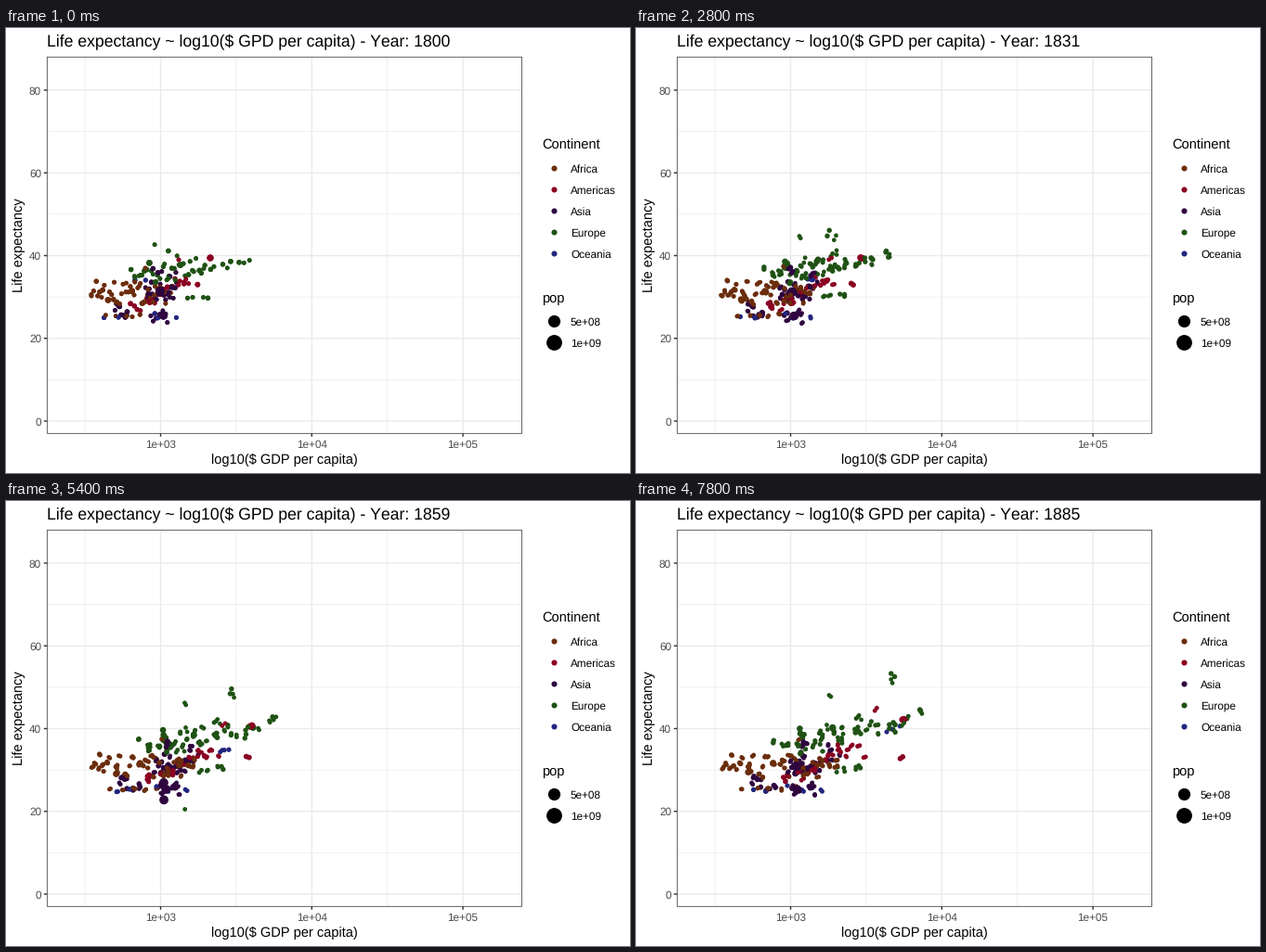
These frames come from a looping animation (672 px wide and 480 px high, 8000 ms). A matplotlib script:

```python
import numpy as np
import matplotlib.pyplot as plt
from matplotlib.animation import FuncAnimation
from matplotlib.patches import Rectangle

W, H, DPI = 672, 480, 96
FRAMES, INTERVAL = 40, 200
LAST = FRAMES - 1
PT = 72 / DPI  # points per pixel

COLORS = {
    "Africa": "#6b2d0c",
    "Americas": "#8b0022",
    "Asia": "#2f053f",
    "Europe": "#1f5214",
    "Oceania": "#23267f",
}
LATE = {"Americas": 3, "Oceania": 7}  # how late life expectancy rises
SWING = {"Europe": 3}  # size of the yearly swing

rng = np.random.default_rng(18)

plt.rcParams["font.family"] = "Liberation Sans"
plt.rcParams["text.hinting"] = "none"
plt.rcParams["text.kerning_factor"] = 6

fig = plt.figure(figsize=(W / DPI, H / DPI), dpi=DPI, facecolor="white")
ax = fig.add_axes([0, 0, 1, 1])
ax.set_xlim(0, W)
ax.set_ylim(H, 0)
ax.axis("off")


def gdp_x(decade):
    return 166.5 + 162.8 * (decade - 3)


def life_y(years):
    return 424 - 4.4625 * years


def rule(x, y, color, width):
    ax.plot(x, y, color=color, lw=width * PT, snap=False,
            solid_capstyle="butt", zorder=1)


def label(x, y, text, size=8.8, color="black", **kw):
    return ax.text(x, y, text, fontsize=size, color=color, va="baseline", **kw)


def area(radius):
    return (2 * np.asarray(radius) * PT) ** 2


def draw_chart():
    left, right, top, bottom = 44.3, 555.6, 31.3, 437.3
    for d in np.arange(2.5, 5.5, 0.5):
        x, major = gdp_x(d), d % 1 == 0
        rule([x, x], [top, bottom], "#ebebeb", 1.42 if major else 0.71)
        if major:
            rule([x, x], [bottom, bottom + 3.5], "#333333", 1.42)
            label(x, 453, f"1e+0{d:.0f}", color="#4d4d4d", ha="center")
    for v in range(0, 81, 10):
        y, major = life_y(v), v % 20 == 0
        rule([left, right], [y, y], "#ebebeb", 1.42 if major else 0.71)
        if major:
            rule([left - 3.5, left], [y, y], "#333333", 1.42)
            label(38, y + 4.4, str(v), color="#4d4d4d", ha="right")
    ax.add_patch(Rectangle((left, top), right - left, bottom - top, fill=False,
                           ec="#333333", lw=0.75 * PT, snap=False, zorder=5))
    label(300, 470, "log10($ GDP per capita)", 11, ha="center")
    label(18, 234.5, "Life expectancy", 11, rotation=90,
          rotation_mode="anchor", ha="center")


def draw_legend():
    def key(y, radius, color, text):
        ax.scatter(589.5, y, s=area(radius), c=color, lw=0)
        label(608, y + 4.4, text)

    label(577.4, 131, "Continent", 11)
    label(577.4, 296, "pop", 11)
    for i, (name, color) in enumerate(COLORS.items()):
        key(151 + 23.04 * i, 3.05, color, name)
    key(316, 6.6, "black", "5e+08")
    key(339, 8.4, "black", "1e+09")


class Dot:
    """One country: drifts right, rises, swings yearly, may crash for a while."""

    def __init__(self, name, x, y, drift, rise, radius=2.4, crash=None):
        self.name, self.radius, self.crash = name, radius, crash
        self.x, self.y, self.drift, self.rise = x, y, drift, rise
        self.phase = rng.uniform(0, 2 * np.pi, 2)
        self.speed = rng.uniform(0.7, 2.2)

    def at(self, t):
        u = max(t, 0) / LAST
        x = self.x + self.drift * u ** 1.1
        y = self.y - self.rise * u ** LATE.get(self.name, 1)
        if self.crash:
            return x, y + self.fall(t)
        sway = np.sin(self.phase + self.speed * t) * min(1, max(t, 0) / 4)
        swing = SWING.get(self.name, 1.2) if self.radius < 4 else 0.2
        return x + sway[0], y + swing * sway[1]

    def fall(self, t):
        """A steady fall to the worst moment, then a quick recovery."""
        worst, span, depth = self.crash
        gap = (worst - t) / span if t < worst else (t - worst) / 1.5
        return depth * max(0, 1 - gap)


def group(name, n, x, y, spread, drift, rise=(0, 0)):
    """Countries from poor to rich: each pair gives the poorest and richest value."""
    out = []
    for i in range(n):
        s = (i + rng.uniform(0, 1)) / n
        px, py, dx, dy = (a + (b - a) * s for a, b in (x, y, drift, rise))
        py += spread * rng.triangular(-1, 0, 1)
        vary = rng.uniform(0.6, 1.4)
        radius = min(3.6, 2.35 + rng.exponential(0.2))
        out.append(Dot(name, px, py, dx * vary, dy * vary, radius))
    return out


def build():
    dots = [
        *group("Africa", 42, (91, 180), (284, 285), 14, (2, 34)),
        *group("Africa", 5, (106, 146), (311, 311), 2, (10, 24)),
        *group("Asia", 24, (150, 184), (285, 285), 15, (14, 26)),
        *group("Asia", 9, (117, 132), (298, 313), 10, (8, 16)),
        *group("Asia", 9, (154, 176), (312, 310), 9, (8, 28)),
        *group("Asia", 5, (152, 184), (256, 268), 6, (22, 28)),
        *group("Americas", 21, (133, 196), (304, 270), 10, (22, 40), (2, 8)),
        *group("Americas", 3, (190, 207), (276, 276), 2, (50, 95)),
        *group("Europe", 34, (134, 216), (267, 258), 12, (20, 36), (2, 16)),
        *group("Europe", 8, (214, 268), (260, 246), 6, (42, 40), (6, 24)),
        *group("Europe", 4, (187, 222), (291, 291), 1, (38, 14), (2, 2)),
        *group("Europe", 3, (160, 188), (232, 248), 2, (80, 76), (36, 44)),
        *group("Oceania", 4, (92, 192), (312, 312), 3, (16, 18)),
        *group("Oceania", 2, (138, 152), (272, 272), 0, (168, 148), (37, 30)),
        Dot("Americas", 220, 248, 67, 13, 3.6),
        Dot("Americas", 186, 250, 73, 26),
        Dot("Africa", 92, 289, 1, 1),
        Dot("Africa", 150, 259, 26, 2),
    ]
    rng.shuffle(dots)
    # the two largest populations, and single countries that crash
    dots += [
        Dot("Asia", 166, 284, 6, -2, 4.9, (27.5, 2, 37)),
        Dot("Asia", 169.5, 310, 4.5, -1, 4.6),
        Dot("Africa", 138, 288, 22, 0, crash=(9.5, 6, 129)),
        Dot("Africa", 160, 288, 20, 0, crash=(20.6, 1.2, 74)),
        Dot("Europe", 175, 270, 26, 0, crash=(28.5, 2, 125)),
        Dot("Oceania", 160, 308, 3, 1, crash=(34.5, 1, 112)),
    ]
    return dots


draw_chart()
draw_legend()
title = label(43.7, 20, "", 13.2)

# each frame spans two neighbouring years, so every country shows twice
dots = build()
pairs = [(d, shift) for d in dots for shift in (-0.5, 0.5)]
marks = ax.scatter([d.x for d, _ in pairs], [d.y for d, _ in pairs],
                   s=area([d.radius for d, _ in pairs]),
                   c=[COLORS[d.name] for d, _ in pairs], lw=0, zorder=4)


def update(k):
    year = 1800 + round(2.18 * k)
    title.set_text(f"Life expectancy ~ log10($ GPD per capita) - Year: {year}")
    marks.set_offsets([d.at(k + shift if k else 0) for d, shift in pairs])
    return marks, title


anim = FuncAnimation(fig, update, frames=FRAMES, interval=INTERVAL,
                     repeat=True, repeat_delay=0, blit=False)
plt.show()
```
